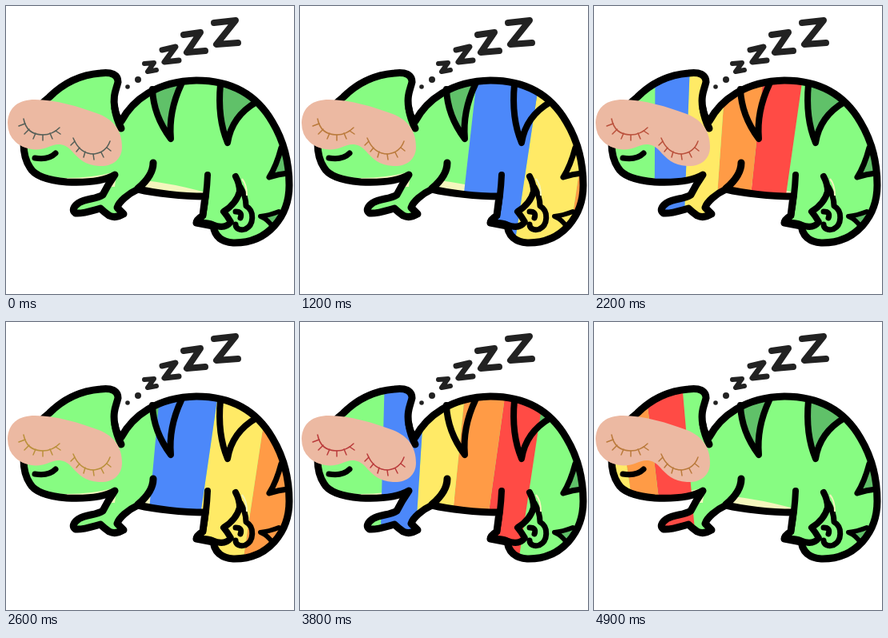
These frames come from a looping animation (360x360 px, 5 s). An HTML page:

```html
<!DOCTYPE html>
<html>
<head>
<meta charset="utf-8">
<style>
html, body { margin: 0; width: 100%; height: 100%; overflow: hidden; background: #fff; }
svg { display: block; width: 100vw; height: 100vh; }
.ink { fill: none; stroke: #000; stroke-width: 9; stroke-linecap: round; stroke-linejoin: round; }
.z { fill: none; stroke: #222; stroke-width: 8; stroke-linecap: round; stroke-linejoin: round; }
</style>
</head>
<body>
<svg viewBox="0 0 360 360">
  <defs>
    <path id="body" d="M22 172 C24 148 38 126 54 114 C70 98 92 86 118 84 C132 82 140 86 140 95
      C138 104 133 112 136 128 Q138 140 144 144 C158 118 188 94 238 93 C284 93 314 112 333 145
      C348 170 354 196 354 224 C354 262 328 297 284 296 C268 295 261 287 259 275
      L238 271 Q238 267 246 262 L249 238 C220 238 186 234 165 229
      C152 235 141 245 139 252 L147 260 Q137 266 129 262 Q122 257 118 253 C107 256 96 260 87 259
      Q80 254 91 246 C101 240 112 242 121 236 Q127 224 136 211 C121 220 98 221 76 220
      C53 218 36 213 30 202 C24 193 22 183 22 172 Z"/>
    <clipPath id="inside"><use href="#body"/></clipPath>
  </defs>

  <use href="#body" fill="#87fc82"/>
  <g clip-path="url(#inside)">
    <path fill="#f4f6bd" d="M54 214 Q96 218 138 207 L136 226 L54 226 Z M174 218 Q208 222 246 232 L248 242 L166 236 Z"/>
    <path fill="#60c169" d="M182 96 L222 92 Q208 125 207 165 Q190 135 182 96 Z M268 92 L314 118 Q286 138 278 170 Q262 130 268 92 Z
      M344 174 L329 214 L356 208 Z M342 256 L318 263 L333 277 Z"/>
    <g id="bands"></g>
  </g>
  <use href="#body" class="ink"/>
  <g class="ink">
    <path d="M184 196 Q184 212 165 228"/>
    <path d="M136 128 Q138 141 144 153"/>
    <path d="M183 104 C184 130 194 150 206 166 Q203 132 219 98" stroke-width="8"/>
    <path d="M268 98 Q264 140 277 171 Q282 138 313 120" stroke-width="8"/>
    <path d="M344 177 Q338 200 329 214 Q341 210 352 209" stroke-width="7"/>
    <path d="M341 257 Q328 262 318 263 Q328 267 333 276" stroke-width="6"/>
    <path d="M252 211 Q251 236 246 262 L238 271 Q251 270 258 273 Q273 280 281 270 Q277 263 272 257 Q288 247 292 232 Q292 222 287 213" stroke-width="8"/>
    <path d="M293 226 Q300 238 300 250 C311 256 310 274 299 279 C292 281 287 278 287 273 M287 257 Q296 257 293 265" stroke-width="7"/>
    <path d="M36 190 Q53 193 62 184" stroke-width="7"/>
  </g>
  <path d="M295 216 Q301 223 301 237" fill="none" stroke="#f4f6bd" stroke-width="2"/>

  <path fill="#ecb9a2" d="M2 146 C3 126 16 117 36 117 C62 117 92 126 116 135 C136 143 145 157 145 176
    C145 192 133 201 116 200 C99 199 91 191 82 181 C72 170 62 172 51 177 C38 182 22 179 12 170 Q2 161 2 146 Z"/>
  <g id="lashes" fill="none" stroke-width="1.5" stroke-linecap="round">
    <path d="M22 141 C25 157 36 161 46 161 Q58 161 67 152"/>
    <path d="M84 165 C90 180 100 185 110 185 Q125 183 130 169"/>
    <path d="M24 147 L16 150 M29 154 L23 160 M37 159 L34 166 M46 161 L46 168 M55 159 L58 166 M62 156 L68 160
      M86 169 L81 174 M92 177 L88 182 M99 182 L97 189 M109 185 L110 192 M119 183 L122 189 M126 177 L131 181"/>
  </g>

  <g class="z">
    <path d="M260 21 L287 18 L263 48 L290 46"/>
    <path d="M222 36 L243 33 L226 58 L249 56"/>
    <path d="M195 55 L212 51 L198 70 L216 68" stroke-width="7"/>
    <path d="M173 72 L185 71 L177 82 L188 80" stroke-width="6"/>
  </g>
  <circle cx="152" cy="101" r="2.8" fill="#222"/>
  <circle cx="165" cy="92" r="4" fill="#222"/>
</svg>
<script>
const STEP = 100, LOOP = 5000, CYCLE = 15;
const colors = ['#ff4b45', '#ff9b46', '#ffea66', '#4c88fa'];
const bands = document.getElementById('bands');
const lashes = document.getElementById('lashes');
const shapes = colors.map(color => {
  const el = document.createElementNS('http://www.w3.org/2000/svg', 'path');
  el.setAttribute('fill', color);
  return bands.appendChild(el);
});

// Edge 0 leads and is the fastest; edges lean forward at the head and backward along the body
function edge(i, p) {
  const x = 291 - 47 * i + (p - 8) * (43 - i * i) + 14 * Math.max(0, 4 - p);
  const lean = Math.max(-0.15, 0.0008 * (70 - x)) + 0.014 * Math.max(0, 7 - p) ** 2;
  return [x - 110 * lean, x + 130 * lean];
}

function lashColor(p) {
  if (p === 0) return '#555f58';
  const hue = 20 - 20 * Math.cos((p - 2) * Math.PI / 3);
  return `hsl(${hue}, 52%, 48%)`;
}

function draw(now) {
  const p = Math.floor(now % LOOP / STEP) % CYCLE;
  shapes.forEach((el, i) => {
    const [a, b] = edge(i, p), [c, d] = edge(i + 1, p);
    el.setAttribute('d', `M${a} 70 L${b} 310 L${d} 310 L${c} 70 Z`);
  });
  lashes.setAttribute('stroke', lashColor(p));
  requestAnimationFrame(draw);
}
draw(0);
</script>
</body>
</html>
```
